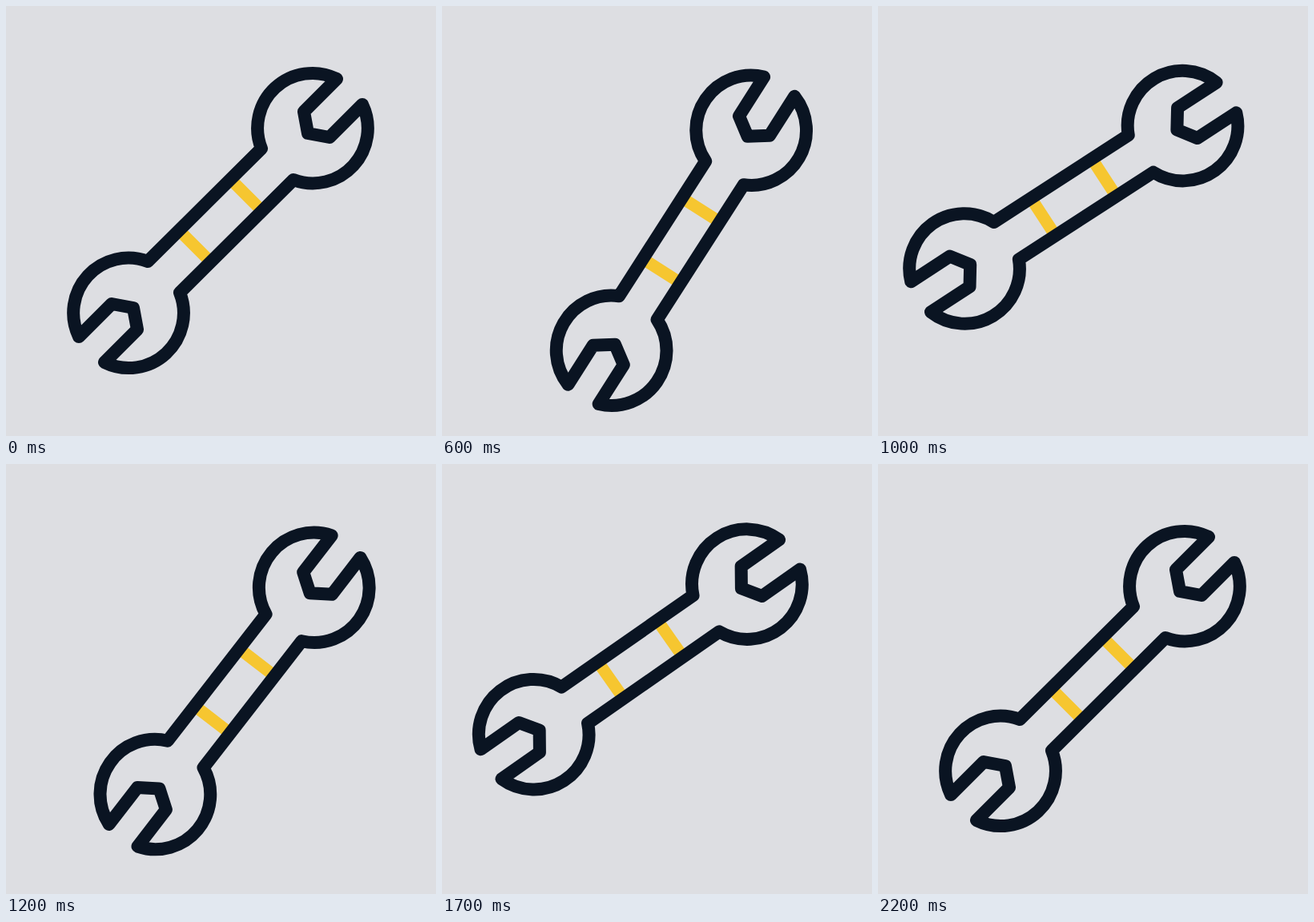
Write an HTML page that moves like this. It is 537 px wide and 537 px high and loops after 2.4 s.

```html
<!DOCTYPE html>
<html lang="en">
<head>
<meta charset="utf-8">
<title>Wrench</title>
<style>
  html, body { margin: 0; height: 100%; overflow: hidden; background: #dddee2; }
  svg { display: block; width: 100%; height: 100%; }
  path { fill: none; stroke-width: 16; stroke-linecap: round; stroke-linejoin: round; }
  .trail, .band { stroke: #f6c630; }
  .band { stroke-width: 15; stroke-linecap: butt; }
  .body { fill: #dddee2; }
  .line { stroke: #0a1422; }
</style>
</head>
<body>
<svg viewBox="0 0 537 537">
  <path class="trail"/>
  <path class="trail"/>
  <g id="wrench">
    <path class="body"/>
    <path class="band" d="M280.5 216.5l39 39M216.5 280.5l39 39"/>
    <path class="line"/>
  </g>
</svg>
<script>
const LOOP = 2400, STEP = 100;
const PIVOT = [396.5, 139.5];

// Swing in degrees, counter-clockwise: [time, angle]
const SWING = [
  [0, 0], [511, 15], [535, 15], [902, -15], [915, -15], [1340, 15],
  [1360, 15], [1712, -10], [1790, -10], [2200, 0], [LOOP, 0]
];

// Trails sweep along a circle between two angles
const TRAILS = [
  { x: 287, y: 262, r: 139.5, from: 173.5, to: 128, start: 200, end: 550 },
  { x: 248, y: 262, r: 152.5, from: 51.3, to: 106.1, start: 620, end: 920 }
];

const wrench = document.getElementById('wrench');
const trailPaths = document.querySelectorAll('.trail');
const clamp = v => Math.min(1, Math.max(0, v));
const smooth = s => s * s * (3 - 2 * s);

// One end of the wrench; the other is its half turn about (268, 268)
function end(flip) {
  const p = (x, y) => flip ? `${536 - x} ${536 - y}` : `${x} ${y}`;
  const arc = 'A68.6 68.6 0 0 1 ';
  return `${p(319, 178)}${arc}${p(413, 91)}L${p(372, 132)}L${p(377, 159)}` +
    `L${p(404, 164)}L${p(445, 123)}${arc}${p(359, 217)}`;
}
const outline = `M${end(false)}L${end(true)}Z`;
document.querySelectorAll('.body, .line').forEach(el => el.setAttribute('d', outline));

function swingAt(t) {
  const i = SWING.findIndex(key => key[0] > t);
  const [t0, a0] = SWING[i - 1], [t1, a1] = SWING[i];
  return a0 + (a1 - a0) * smooth((t - t0) / (t1 - t0));
}

function trailAt({ x, y, r, from, to, start, end }, t) {
  const u = (t - start) / (end - start);
  if (u <= 0 || u >= 1) return '';
  const point = part => {
    const a = (from + (to - from) * clamp(part)) * Math.PI / 180;
    return `${x + r * Math.cos(a)} ${y + r * Math.sin(a)}`;
  };
  const tail = point(u * 1.5 - 0.5), head = point(u * 1.5);
  return `M${tail}A${r} ${r} 0 0 ${to > from ? 1 : 0} ${head}`;
}

function draw(now) {
  const t = Math.floor(now % LOOP / STEP) * STEP;
  wrench.setAttribute('transform', `rotate(${-swingAt(t)} ${PIVOT})`);
  TRAILS.forEach((trail, i) => trailPaths[i].setAttribute('d', trailAt(trail, t)));
}

const begin = performance.now();
function tick() {
  draw(performance.now() - begin);
  requestAnimationFrame(tick);
}
tick();
</script>
</body>
</html>
```
